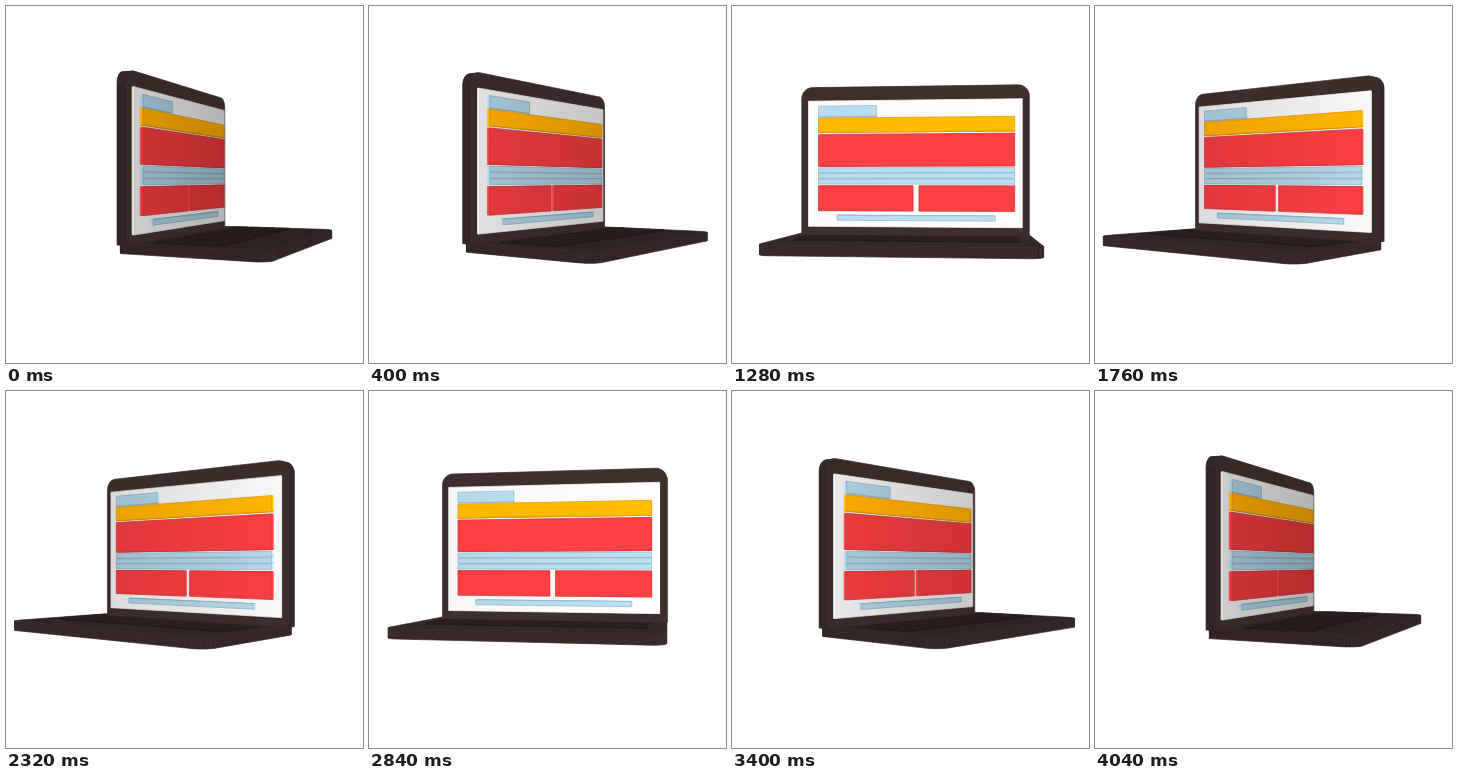
An HTML page with a canvas for the animation above (4080 ms loop, 357 px wide and 357 px high).

```html
<!DOCTYPE html>
<html lang="en">
<head>
<meta charset="utf-8">
<title>Turning laptop</title>
<style>
  html, body { margin: 0; width: 100%; height: 100%; overflow: hidden; background: #fff; }
  canvas { display: block; width: 100vmin; height: 100vmin; }
</style>
</head>
<body>
<canvas id="stage"></canvas>
<script>
const SIZE = 357, LOOP = 4080, STEP = 40;
const CX = 178.5, HORIZON = 173.5, DIST = 660, LAMP = 400;
const HINGE = -2, DECK = 54.5, THICK = 10.5;
const LEFT = -104, RIGHT = 110.5;

// Yaw in degrees over time in ms
const TURN = [
  [0, 65.5], [560, 49], [720, 40], [1120, 8.5], [1280, -5.5], [1680, -34.5], [2040, -45],
  [2320, -39], [2840, -11.5], [3080, 13], [3400, 50.5], [3700, 62], [4040, 65.5], [4080, 65.5]
];

const WHITE = [258, 258, 259], RED = [262, 65, 68], AMBER = [280, 190, 0], BLUE = [186, 226, 246];
const BODY = [62, 47, 44], EDGE = [56, 42, 40], TOP = [52, 40, 38], KEY = [44, 33, 32];

// left, top, right, bottom, colour
const BARS = [
  [-93, -74, -34, -63.3, BLUE],
  [-93, -62, 103, -47.6, AMBER],
  [-93, -45.5, 103, -13.5, RED],
  [-93, -11.8, 103, -6.9, BLUE],
  [-93, -6, 103, -1.3, BLUE],
  [-93, -.4, 103, 4.6, BLUE],
  [-93, 6.5, 2.5, 31.5, RED],
  [8.7, 6.5, 103, 31.5, RED],
  [-74, 36, 84, 41, BLUE]
];

const canvas = document.getElementById('stage');
const ctx = canvas.getContext('2d');
const ratio = Math.max(1, window.devicePixelRatio || 1);
canvas.width = canvas.height = SIZE * ratio;
ctx.scale(ratio, ratio);
ctx.lineJoin = 'round';

let sin = 0, cos = 1;

const slope = i => {
  const a = TURN[i - 1], b = TURN[i + 1];
  return a && b ? (b[1] - a[1]) / (b[0] - a[0]) : 0;
};

// Cubic Hermite curve through the turn points
function yawAt(t) {
  let i = 0;
  while (i < TURN.length - 2 && t >= TURN[i + 1][0]) i++;
  const [t0, a] = TURN[i], [t1, b] = TURN[i + 1];
  const h = t1 - t0, u = (t - t0) / h, v = 1 - u;
  return a * (1 + 2 * u) * v * v + b * (3 - 2 * u) * u * u
    + h * u * v * (slope(i) * v - slope(i + 1) * u);
}

function project([x, y, z]) {
  const k = DIST / (DIST + x * sin - z * cos);
  return [CX + (x * cos + z * sin) * k, HORIZON + y * k];
}

const shade = (rgb, f) => `rgb(${rgb.map(c => Math.min(255, Math.round(c * f))).join()})`;

// Diffuse light on the screen plane at local x, from a lamp in front
function lightAt(x) {
  const dx = -x * cos, dz = LAMP + x * sin;
  return .55 + .45 * (dx * sin + dz * cos) / Math.hypot(dx, dz);
}

// Colour that follows the light across the screen
function lit(rgb, f = 1) {
  const gradient = ctx.createLinearGradient(project([LEFT, 0, 0])[0], 0, project([RIGHT, 0, 0])[0], 0);
  gradient.addColorStop(0, shade(rgb, f * lightAt(LEFT)));
  gradient.addColorStop(1, shade(rgb, f * lightAt(RIGHT)));
  return gradient;
}

function fill(points, color, outline = color) {
  ctx.beginPath();
  points.forEach(p => ctx.lineTo(p[0], p[1]));
  ctx.closePath();
  ctx.fillStyle = color;
  ctx.strokeStyle = outline;
  ctx.lineWidth = .7;
  ctx.fill();
  ctx.stroke();
}

const area = pts => pts.reduce((sum, p, i) => {
  const q = pts[(i + 1) % pts.length];
  return sum + p[0] * q[1] - q[0] * p[1];
}, 0);

// Replaces each corner [x, y, radius] with a short curve
function rounded(corners) {
  const n = corners.length, out = [];
  corners.forEach(([x, y, r], i) => {
    if (!r) { out.push([x, y]); return; }
    const toward = c => {
      const len = Math.hypot(c[0] - x, c[1] - y);
      return [(c[0] - x) / len * r, (c[1] - y) / len * r];
    };
    const a = toward(corners[(i + n - 1) % n]), b = toward(corners[(i + 1) % n]);
    for (let s = 0; s <= 8; s++) {
      const ang = s / 8 * Math.PI / 2;
      const p = 1 - Math.sin(ang), q = 1 - Math.cos(ang);
      out.push([x + a[0] * p + b[0] * q, y + a[1] * p + b[1] * q]);
    }
  });
  return out;
}

const rect = (l, t, r, b) => [[l, t], [r, t], [r, b], [l, b]];
const upright = (u, v, w) => [u, v, w];
const flat = (u, v, w) => [u, w, v];

// Extruded outline: the visible sides, then the face
function prism(outline, place, near, far, face, side, rim) {
  const front = outline.map(([u, v]) => project(place(u, v, near)));
  const back = outline.map(([u, v]) => project(place(u, v, far)));
  front.forEach((p, i) => {
    const j = (i + 1) % front.length;
    const quad = [p, front[j], back[j], back[i]];
    if (area(quad) < 0) fill(quad, side(outline[i], outline[j]));
  });
  fill(front, face, rim);
}

const LID = rounded([[-111.5, -93.5, 11], [117.5, -93.5, 11], [117.5, 56, 0], [-111.5, 56, 0]]);
const BASE = rounded([[-111, HINGE - THICK, 7], [117, HINGE - THICK, 7], [120, 124, 13], [-118, 124, 13]]);

function drawKeys() {
  const cols = 14, rows = 4, left = -97, pitch = 14.4;
  for (let r = 0; r < rows; r++) {
    for (let c = 0; c < cols; c++) {
      const x = left + c * pitch, z = 18 + r * 16;
      const key = rect(x, z, x + 12, z + 13);
      prism(key, flat, DECK - 1.2, DECK, shade(KEY, 1), () => shade(KEY, .8));
    }
  }
}

function draw(t) {
  const yaw = yawAt(t) * Math.PI / 180;
  sin = Math.sin(yaw);
  cos = Math.cos(yaw);
  const bodyLight = .5 + lightAt(0) / 2;

  ctx.fillStyle = '#fff';
  ctx.fillRect(0, 0, SIZE, SIZE);

  const edge = () => shade(EDGE, bodyLight);
  const litSide = color => (a, b) => lit(color, a[0] === b[0] ? 1.13 : .78);

  prism(BASE, flat, DECK, 63.2, shade(TOP, bodyLight), edge);
  drawKeys();
  prism(LID, upright, HINGE, HINGE - THICK, shade(BODY, bodyLight), edge);
  prism(rect(LEFT, -79.5, RIGHT, 47.5), upright, HINGE + 2, HINGE, lit(WHITE), litSide(WHITE));
  for (const [l, top, r, b, color] of BARS) {
    prism(rect(l, top, r, b), upright, HINGE + 4.8, HINGE + 2, lit(color), litSide(color), lit(color, .82));
  }
}

function tick() {
  const t = performance.now() % LOOP;
  draw(Math.floor(t / STEP) * STEP);
  requestAnimationFrame(tick);
}
tick();
</script>
</body>
</html>
```
